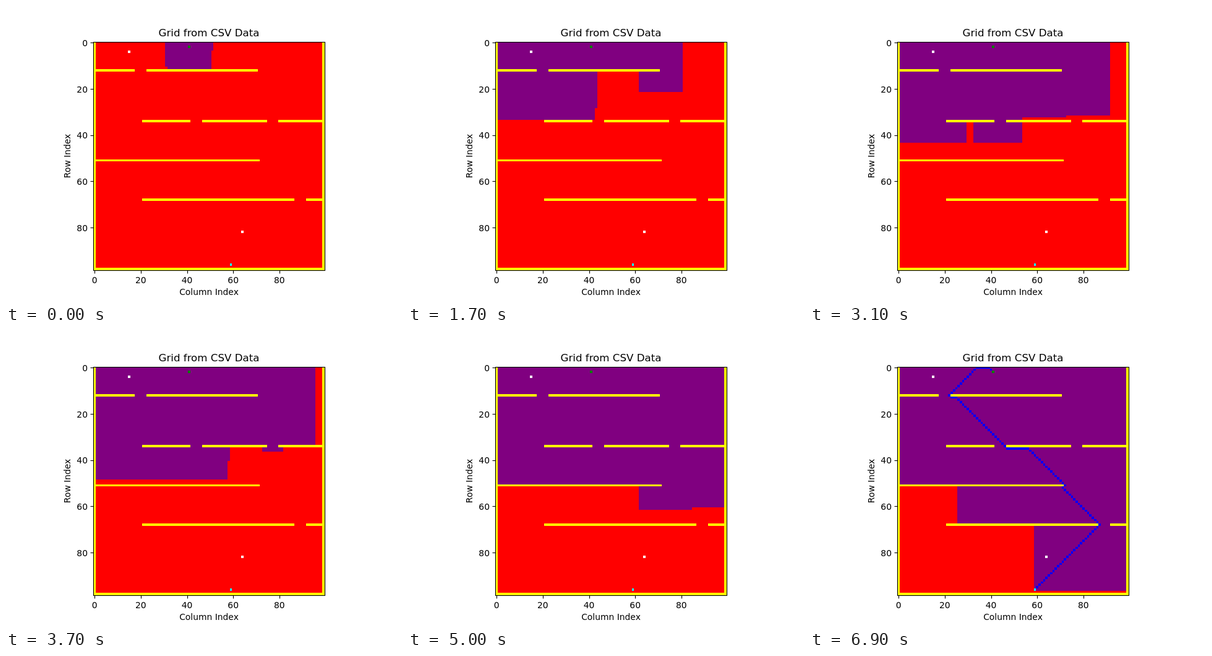
An HTML page with a canvas that plays this animation: 640x480 px, repeating every 7.39 s.

```html
<!DOCTYPE html>
<html lang="en">
<head>
<meta charset="utf-8">
<title>Grid search</title>
<style>
  html, body { margin: 0; width: 100%; height: 100%; overflow: hidden; background: #fff; }
  canvas { display: block; }
</style>
</head>
<body>
<canvas id="stage" width="640" height="480"></canvas>
<script>
const ctx = document.getElementById('stage').getContext('2d');
const ROWS = 99, COLS = 100;
const LOOP = 7390, STEP = 100, LAST = 69;
const FIRST_POPS = 200, POPS_PER_STEP = 100;
const COLORS = {
  free: '#ff0000', wall: '#ffff00', block: '#ffffff', start: '#008000',
  goal: '#00ffff', seen: '#800080', path: '#0000ff'
};

const id = (row, col) => row * COLS + col;
const START = id(2, 41), GOAL = id(96, 59);
const grid = new Array(ROWS * COLS).fill('free');

function wall(row, from, to) {
  for (let col = from; col <= to; col++) grid[id(row, col)] = 'wall';
}

for (let row = 0; row < ROWS; row++) {
  wall(row, 0, 0);
  wall(row, 99, 99);
}
[[12, 0, 17], [12, 23, 70], [34, 21, 41], [34, 47, 74], [34, 80, 99],
 [51, 0, 71], [68, 21, 86], [68, 92, 99], [98, 0, 99]].forEach(w => wall(...w));
grid[id(4, 15)] = grid[id(82, 64)] = 'block';
grid[START] = 'start';
grid[GOAL] = 'goal';

// Breadth-first search over eight neighbours; foundAt holds the pop count at discovery.
const foundAt = new Array(grid.length).fill(Infinity);
const parent = [];
const queue = [START];
foundAt[START] = 0;
for (let pops = 1; pops <= queue.length; pops++) {
  const cell = queue[pops - 1];
  const row = Math.floor(cell / COLS), col = cell % COLS;
  for (let dr = -1; dr <= 1; dr++) {
    for (let dc = -1; dc <= 1; dc++) {
      const r = row + dr, c = col + dc;
      if (r < 0 || r >= ROWS || c < 0 || c >= COLS) continue;
      const next = id(r, c);
      if (grid[next] === 'wall' || grid[next] === 'block' || foundAt[next] < Infinity) continue;
      foundAt[next] = pops;
      parent[next] = cell;
      queue.push(next);
    }
  }
}

const path = new Set();
for (let cell = parent[GOAL]; cell !== START; cell = parent[cell]) path.add(cell);

// Cell edges snap to whole pixels.
const edgeX = col => 141 + Math.round(col * 374 / COLS);
const edgeY = row => Math.max(58, 57 + Math.round(row * 370 / ROWS));

function cellKind(cell, pops, solved) {
  const kind = grid[cell];
  if (kind !== 'free') return kind;
  if (solved && path.has(cell)) return 'path';
  return foundAt[cell] <= pops ? 'seen' : 'free';
}

function drawGrid(step) {
  const pops = FIRST_POPS + step * POPS_PER_STEP;
  for (let row = 0; row < ROWS; row++) {
    const y = edgeY(row), height = edgeY(row + 1) - y;
    for (let col = 0; col < COLS; col++) {
      const x = edgeX(col);
      ctx.fillStyle = COLORS[cellKind(id(row, col), pops, step === LAST)];
      ctx.fillRect(x, y, edgeX(col + 1) - x, height);
    }
  }
}

function text(label, x, y, align = 'center', size = 13.889) {
  ctx.font = `${size}px "DejaVu Sans", sans-serif`;
  ctx.textAlign = align;
  ctx.fillText(label, x, y);
}

function line(x1, y1, x2, y2) {
  ctx.beginPath();
  ctx.moveTo(x1, y1);
  ctx.lineTo(x2, y2);
  ctx.stroke();
}

function drawAxes() {
  const cell = 369.6 / ROWS;
  ctx.fillStyle = ctx.strokeStyle = '#000';
  ctx.lineWidth = 1.111;
  ctx.strokeRect(141.5, 58.5, 374, 369);
  for (let value = 0; value <= 80; value += 20) {
    const x = 141.333 + (value + 0.5) * cell;
    const y = 57.6 + (value + 0.5) * cell;
    const tickX = Math.round(x) + 0.5, tickY = Math.round(y) + 0.5;
    line(tickX, 427.5, tickX, 432.5);
    line(136.5, tickY, 141.5, tickY);
    text(value, x, 448);
    text(value, 132, Math.round(y + 5.5), 'right');
  }
  text('Grid from CSV Data', 328, 49, 'center', 16.667);
  text('Column Index', 328, 467);
  ctx.save();
  ctx.translate(104, 242.4);
  ctx.rotate(-Math.PI / 2);
  text('Row Index', 0, 0);
  ctx.restore();
}

let shown = -1;
function render() {
  const step = Math.min(LAST, Math.floor(performance.now() % LOOP / STEP));
  if (step !== shown) {
    shown = step;
    ctx.fillStyle = '#fff';
    ctx.fillRect(0, 0, 640, 480);
    drawGrid(step);
    drawAxes();
  }
  requestAnimationFrame(render);
}
render();
</script>
</body>
</html>
```
